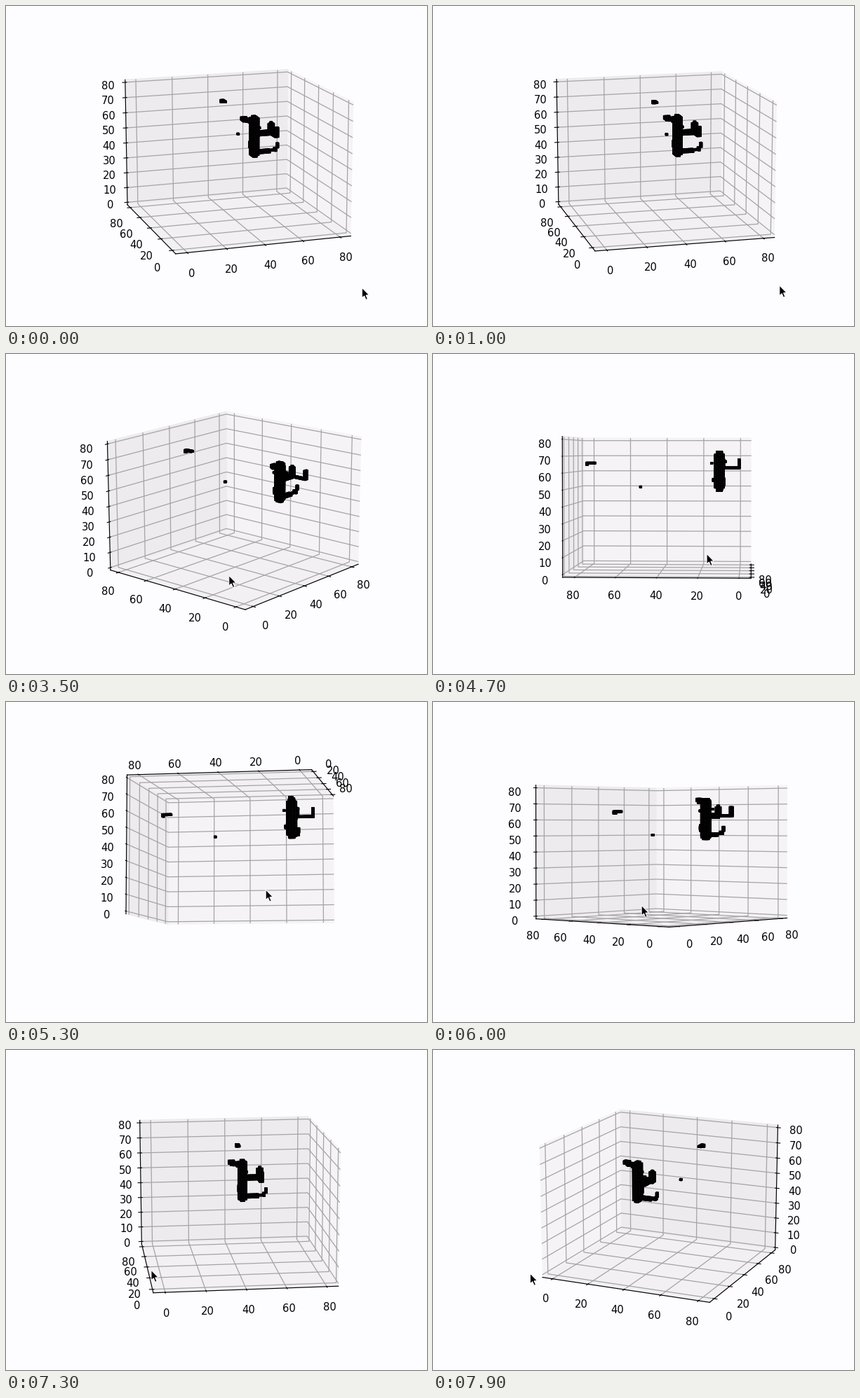
Animation of 600 by 457 pixels, one loop 8 s. Source, as a matplotlib script:

```python
import numpy as np
import matplotlib.pyplot as plt
from matplotlib.animation import FuncAnimation
from matplotlib.patches import Polygon

W, H, DPI = 600, 457, 100
STEP, FRAMES = 100, 80
SIDE = 394              # edge of the square 3D axes in pixels
TURN = 180 / SIDE       # degrees of rotation per dragged pixel

plt.rcParams.update({
    "font.size": 10.6, "axes.linewidth": 0.85,
    "grid.linewidth": 0.9, "grid.color": "#a4a3a5",
})

# Camera turning points: time, azimuth, elevation
VIEW = np.array([
    (0, -108.7, 14), (400, -113, 14.8), (1100, -103.6, 12.7),
    (2200, -103.6, 12.7), (2500, -124, 18), (2800, -135.2, 16),
    (3400, -135.2, 16), (3500, -139.3, 16), (4700, -176.6, 2),
    (5300, -169.7, -6), (5500, -163, -8.5), (6100, -133, 3),
    (6700, -128.3, 11.3), (8000, -60.5, 16.1),
])

# Drags with the button held: start, end, x and y at the start
DRAGS = [(0, 1200, 505, 402), (2100, 2900, 353, 300), (3100, 8000, 302, 319)]

ARROW = np.array([(0, 0), (0, 14.5), (3.3, 11.5), (5.6, 17), (8, 16),
                  (5.7, 10.6), (10.2, 10.4)])


def camera(t):
    return np.array([np.interp(t, VIEW[:, 0], col) for col in VIEW[:, 1:].T])


def dragged(drag, t):
    """Pointer place during a drag; the view trails it by one step."""
    start, _, x, y = drag
    turned = camera(t + STEP) - camera(start)
    return np.array([x, y]) + turned * (-1, 1) / TURN


def pointer_at(t):
    k = max(i for i, drag in enumerate(DRAGS) if drag[0] <= t)
    end = DRAGS[k][1]
    pos = dragged(DRAGS[k], min(t, end))
    if t > end:
        following = DRAGS[k + 1]
        share = (t - end) / (following[0] - end)
        pos += share * (dragged(following, following[0]) - pos)
    return pos


class Clay:
    """Voxel grid filled by sweeping a ball along lines."""

    def __init__(self, size=82):
        self.centers = np.stack(np.indices((size,) * 3), axis=-1) + 0.5
        self.filled = np.zeros((size,) * 3, dtype=bool)

    def sweep(self, radius, *points):
        points = np.array(points, dtype=float)
        for a, b in zip(points, points[1:] if len(points) > 1 else points):
            line = b - a
            rel = self.centers - a
            share = np.clip(rel @ line / max(line @ line, 1e-9), 0, 1)
            gap = rel - share[..., None] * line
            self.filled |= (gap ** 2).sum(axis=-1) <= radius ** 2


def model():
    clay = Clay()
    # torso, hips, crest and nose
    clay.sweep(2.1, (40, 10.5, 50), (40, 10.5, 71))
    clay.sweep(2.1, (40, 11.5, 54), (40, 11.5, 56))
    clay.sweep(1.2, (33.5, 10, 72), (38, 10.5, 70.5))
    clay.sweep(1.0, (41, 8, 66.5))
    # arm with a raised thumb and hand
    clay.sweep(1.2, (42, 9.5, 62.5), (48.5, 9.5, 62.5))
    clay.sweep(1.1, (48.5, 9.5, 63), (48.5, 9.5, 68))
    clay.sweep(0.75, (48, 8, 62), (48, 0.5, 63), (48, 0.5, 67.5))
    # leg and toe
    clay.sweep(0.8, (41, 10, 51), (47, 10, 51), (50.5, 9, 52))
    clay.sweep(0.5, (51.5, 8.5, 53.5), (51.5, 8.5, 55.5))
    # loose specks
    clay.sweep(0.75, (46, 75, 66), (46, 79.5, 65))
    clay.sweep(0.5, (45.5, 51.5, 50.5))
    clay.sweep(0.5, (40.5, 14.5, 65.5))
    return clay.filled


fig = plt.figure(figsize=(W / DPI, H / DPI), dpi=DPI, facecolor="#fdfcff")

ax = fig.add_axes((124.2 / W, 40.6 / H, SIDE / W, SIDE / H), projection="3d")
ax.set_facecolor("none")
ax.voxels(model(), facecolors="#141814", edgecolors="black",
          linewidth=1, shade=False)

# Limits include the small gap between the data range and the panes.
ax.set(xlim=(-5.83, 85.83), ylim=(-5.83, 85.83), zlim=(-1.67, 81.67),
       xticks=range(0, 81, 20), yticks=range(0, 81, 20),
       zticks=range(0, 81, 10))
ax.tick_params(pad=4.2)
for axis, color in ((ax.xaxis, "#f5f3f6"), (ax.yaxis, "#edebee"),
                    (ax.zaxis, "#f2f0f3")):
    axis.set_pane_color(color)

overlay = fig.add_axes((0, 0, 1, 1), zorder=10)
overlay.set(xlim=(0, W), ylim=(H, 0))
overlay.axis("off")
pointer = overlay.add_patch(Polygon(ARROW, closed=True, facecolor="black",
                                    edgecolor="white", linewidth=0.7))


def draw(i):
    t = i * STEP
    azim, elev = camera(t)
    ax.view_init(elev=elev, azim=azim)
    pointer.set_xy(ARROW + pointer_at(t))
    return (pointer,)


anim = FuncAnimation(fig, draw, frames=FRAMES, interval=STEP,
                     init_func=lambda: draw(0), repeat=True, blit=False)
plt.show()
```
